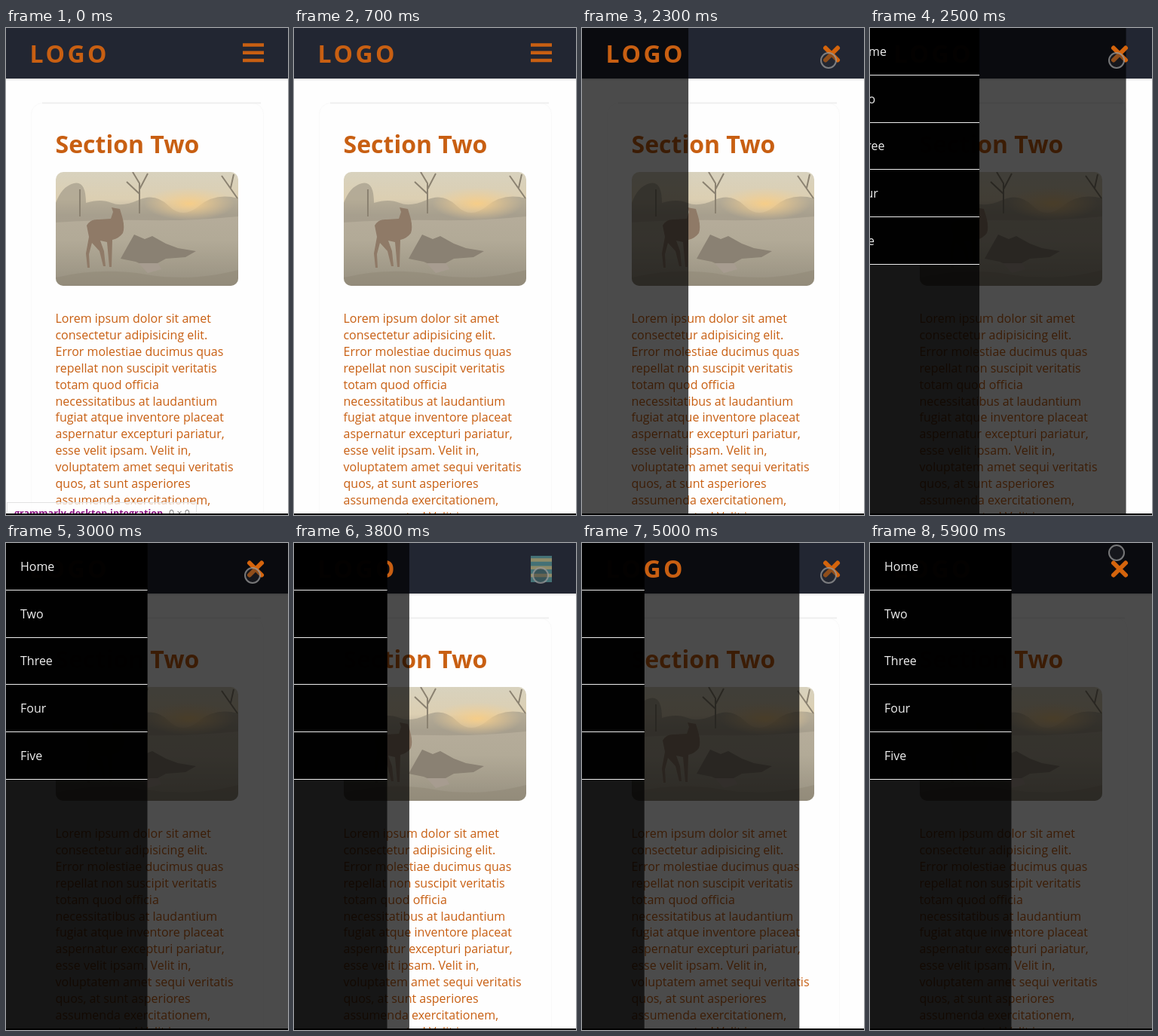
An HTML page that plays this animation: 374 px wide and 646 px high, repeating every 6 s.

```html
<!DOCTYPE html>
<html lang="en">
<head>
<meta charset="utf-8">
<title>Mobile menu</title>
<style>
html, body { margin: 0; width: 100%; height: 100%; overflow: hidden; background: #fefefe; }
svg { display: block; width: 374px; height: 646px; font: 16px "Open Sans", "Noto Sans", sans-serif; }
.bold { font-weight: 700; font-size: 32px; }
.accent { fill: #c85f12; }
</style>
</head>
<body>
<svg viewBox="0 0 374 646">
  <defs>
    <linearGradient id="sky" x2="0" y2="1">
      <stop offset="0" stop-color="#d8d2be"/>
      <stop offset=".24" stop-color="#dccfb2"/>
      <stop offset=".38" stop-color="#b5ac9a"/>
      <stop offset=".6" stop-color="#b2aa97"/>
      <stop offset="1" stop-color="#979080"/>
    </linearGradient>
    <radialGradient id="glow">
      <stop offset="0" stop-color="#f6cd88"/>
      <stop offset="1" stop-color="#f0cf98" stop-opacity="0"/>
    </radialGradient>
    <linearGradient id="shade" x2="0" y2="1">
      <stop offset="0" stop-color="#000" stop-opacity=".15"/>
      <stop offset="1" stop-color="#000" stop-opacity="0"/>
    </linearGradient>
    <clipPath id="frame"><rect x="66" y="191" width="242" height="151" rx="10"/></clipPath>
  </defs>

  <rect width="374" height="646" fill="#fefefe"/>
  <rect x="33.5" y="99.5" width="308" height="600" rx="15" fill="#fefefe" stroke="#f9f9f9"/>
  <path d="M48 99.5H338" stroke="#efefef" stroke-width="2"/>
  <text class="bold accent" x="65.5" y="166">Section Two</text>

  <g clip-path="url(#frame)">
    <rect x="66" y="191" width="242" height="151" fill="url(#sky)"/>
    <path d="M66 232q8-22 24-26t16 26q20-6 34 0t36-4 40 8 40 0 52-10V250q-60 6-120 5T66 258z" fill="#a09888" opacity=".65"/>
    <ellipse cx="243" cy="233" rx="60" ry="22" fill="url(#glow)"/>
    <path d="M177 246V206L168 191M177 214L188 193M177 220L160 204M307 226L286 196M298 212L302 194M98 250V214" fill="none" stroke="#8b8271" stroke-width="2"/>
    <path d="M152 306l10-18 8-14 14 6 10-4 18 10 16 6 24 4-14 8-26 2-22 12-18-8z" fill="#8a8173"/>
    <path d="M176 312h26l4 8-18 5z" fill="#a79c90"/>
    <path d="M107 262q5-9 16-8l16-1 3-9-2-6 5 1 6 1 3 10q4 14 1 22-5 7-14 9l-1 36h-3l-3-33-9-2 5 14 2 20h-3l-5-20-10-11-4 15 1 18h-3l-2-19 4-22z" fill="#8f7a67"/>
    <path d="M66 331q60-14 120-4t122-6v25H66z" fill="#8f8776" opacity=".5"/>
  </g>

  <g id="copy" class="accent"></g>

  <g id="tip">
    <rect x="1.5" y="629.5" width="251" height="24" fill="#fff" fill-opacity=".7" stroke="#e2e2e2"/>
    <text x="11" y="647.5" font-size="12.5" font-weight="700" fill="#881280">grammarly-desktop-integration</text>
    <text x="216" y="647.5" font-size="12.5" fill="#777">0 × 0</text>
  </g>

  <rect y="67" width="374" height="3" fill="url(#shade)"/>
  <rect width="374" height="67" fill="#222632"/>
  <rect id="veil" height="644" fill-opacity=".7"/>
  <text class="bold accent" x="31.5" y="46" letter-spacing="3.5">LOGO</text>
  <path id="bars" d="M314 22.5h28M314 32.8h28M314 43h28" stroke="#c85f12" stroke-width="4.5"/>
  <path id="cross" d="M323 26.5l16 16M339 26.5l-16 16" stroke="#d4640c" stroke-width="6" stroke-linecap="round"/>
  <rect id="tap" x="314" y="17" width="28" height="35" fill="#62b0b0" fill-opacity=".55"/>
  <g id="menu">
    <rect width="187.5" height="644" fill-opacity=".7"/>
    <rect width="187.5" height="314" fill-opacity=".95"/>
  </g>
  <circle id="pointer" cx="327" r="10" fill="#282a30" fill-opacity=".4" stroke="#999" stroke-opacity=".75" stroke-width="2"/>
  <rect y="644" width="374" height="2"/>
</svg>
<script>
const $ = id => document.getElementById(id);

function add(parent, tag, attrs, text = "") {
  const el = document.createElementNS("http://www.w3.org/2000/svg", tag);
  for (const key in attrs) el.setAttribute(key, attrs[key]);
  el.textContent = text;
  parent.append(el);
}

`Lorem ipsum dolor sit amet
consectetur adipisicing elit.
Error molestiae ducimus quas
repellat non suscipit veritatis
totam quod officia
necessitatibus at laudantium
fugiat atque inventore placeat
aspernatur excepturi pariatur,
esse velit ipsam. Velit in,
voluptatem amet sequi veritatis
quos, at sunt asperiores
assumenda exercitationem,
consequuntur! Velit in`.split("\n").forEach((line, i) =>
  add($("copy"), "text", { x: 65.5, y: 391 + 21.9 * i }, line));

["Home", "Two", "Three", "Four", "Five"].forEach((name, i) => {
  const y = Math.round(61.9 + 62.75 * i);
  add($("menu"), "text", { x: 19, y: y - 25, fill: "#eee" }, name);
  add($("menu"), "rect", { y, width: 187.5, height: 1, fill: "#eee" });
});

const clamp = x => Math.min(1, Math.max(0, x));

// CSS "ease": cubic-bezier(.25, .1, .25, 1)
function ease(x) {
  let lo = 0, hi = 1;
  const bezier = (u, a, b) => 3 * u * (1 - u) * ((1 - u) * a + u * b) + u ** 3;
  for (let i = 0; i < 20; i++) {
    const mid = (lo + hi) / 2;
    if (bezier(mid, .25, .25) < x) lo = mid; else hi = mid;
  }
  return bezier(lo, .1, 1);
}

const OPEN = 2182, CLOSE = 3629, REOPEN = 4765;
const ramp = (t, start, length) => ease(clamp((t - start) / length));
const amount = (t, length, openDelay, closeDelay) =>
  t < CLOSE ? ramp(t, OPEN + openDelay, length)
  : t < REOPEN ? 1 - ramp(t, CLOSE + closeDelay, length)
  : ramp(t, REOPEN + openDelay, length);
const show = (id, on) => $(id).setAttribute("visibility", on ? "visible" : "hidden");

function draw(now) {
  const t = Math.floor(now % 6000 / 100) * 100;
  const open = t >= OPEN && t < CLOSE || t >= REOPEN;
  $("veil").setAttribute("width", 374 * amount(t, 500, 0, 0));
  $("menu").setAttribute("transform", `translate(${187.5 * (amount(t, 400, 129, 83) - 1)})`);
  show("bars", !open);
  show("cross", open);
  show("tap", t >= CLOSE && t < 3900);
  show("tip", t < 100);
  show("pointer", t >= 1000);
  $("pointer").setAttribute("cy", t >= 5900 ? 13 : -10 + 53 * ramp(t, 1000, 500));
  requestAnimationFrame(draw);
}
requestAnimationFrame(draw);
</script>
</body>
</html>
```
